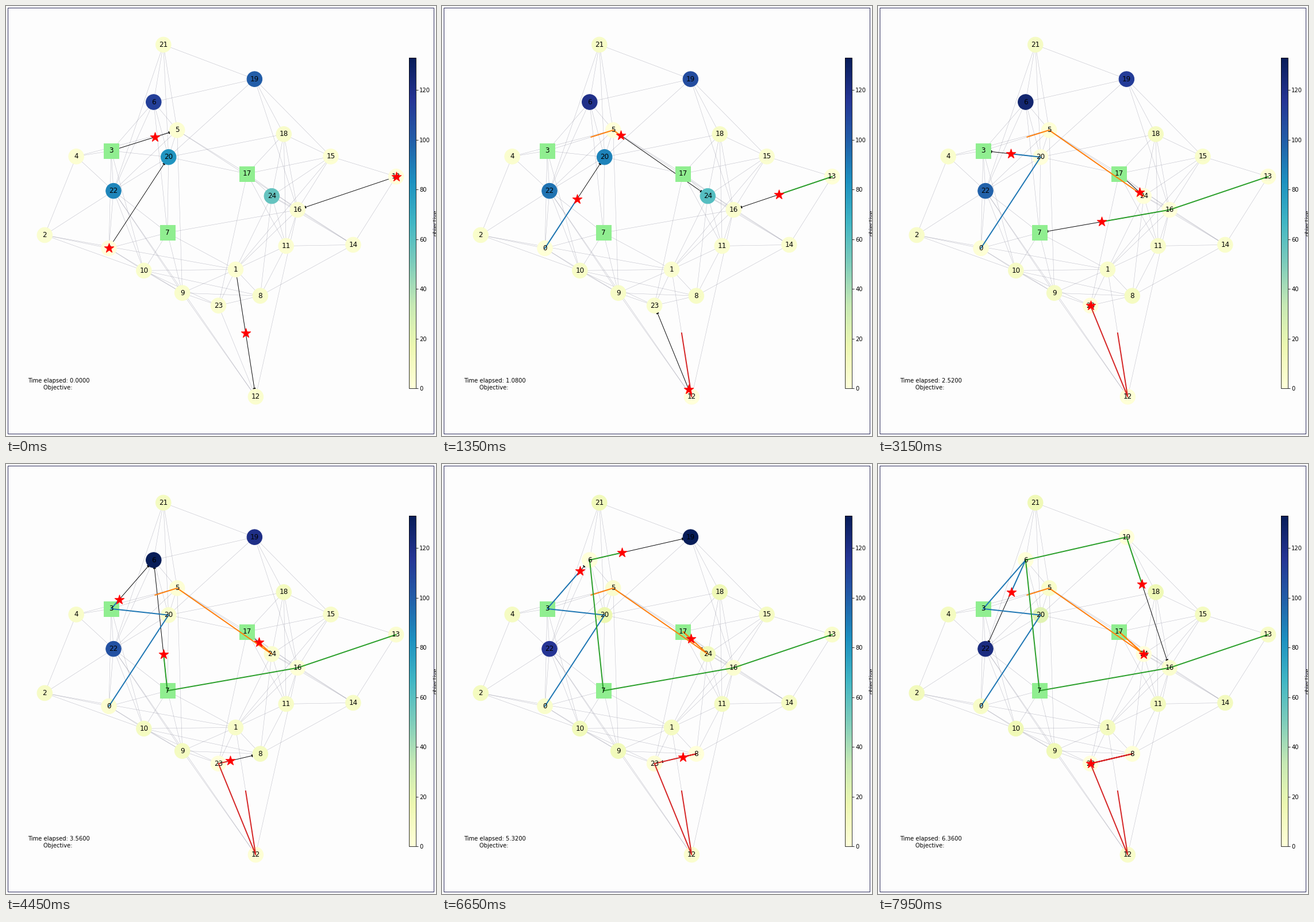
These frames come from a looping animation (748 by 748 pixels, 8 s). A matplotlib script:

```python
import random
from itertools import combinations, pairwise
from math import dist

import matplotlib.pyplot as plt
import numpy as np
from matplotlib.animation import FuncAnimation
from matplotlib.cm import ScalarMappable
from matplotlib.collections import LineCollection
from matplotlib.colors import Normalize
from matplotlib.patches import FancyArrowPatch, Rectangle

SIZE = 748
SPAN = 750        # layout units across the stage
FRAMES = 160
DT = 0.04
TOP = 133
REACH = 155       # nodes closer than this are linked

plt.rcParams["font.family"] = "DejaVu Sans"
rng = random.Random(4)

NODES = [
    (179, 422), (400, 459), (67, 399), (183, 252), (122, 262),
    (298, 216), (257, 167), (281, 395), (443, 505), (307, 500),
    (240, 461), (488, 418), (435, 681), (680, 297), (605, 416),
    (566, 262), (508, 355), (420, 292), (484, 223), (433, 127),
    (283, 263), (274, 67), (187, 322), (370, 522), (463, 331),
]
DEPOTS = (3, 7, 17)
CITIES = [n for n in range(len(NODES)) if n not in DEPOTS]

# chains of links that span more than REACH
CHAINS = [
    (15, 19, 6, 22, 9, 12, 23, 17), (21, 19, 20, 21, 22, 12, 16, 19),
    (14, 8, 24, 14, 5, 9), (8, 10, 2, 1, 10), (20, 18, 11),
    (6, 7, 16), (12, 1, 15), (0, 3, 10), (4, 5),
]

# (node, arrival time) along each route
ROUTES = {
    "tab:blue": [(0, 0), (20, 2), (3, 3), (6, 6), (22, 7)],
    "tab:orange": [(3, -2), (5, 1), (24, 2), (17, 5), (24, 6), (24, 7)],
    "tab:green": [(13, 0), (16, 2), (7, 3), (6, 5), (19, 6), (16, 7)],
    "tab:red": [(1, -1), (12, 1), (23, 2), (23, 3), (8, 5), (23, 6), (23, 7)],
}

BUSY = {6: 112, 19: 100, 20: 82, 22: 87, 24: 57}
BASE = {n: BUSY.get(n, rng.uniform(3, 7)) for n in CITIES}


def links():
    near = {p for p in combinations(range(len(NODES)), 2)
            if dist(NODES[p[0]], NODES[p[1]]) < REACH}
    far = {tuple(sorted(p)) for c in CHAINS for p in pairwise(c)}
    return [(NODES[a], NODES[b]) for a, b in sorted(near | far)]


def value(node, s):
    """Grows steadily and falls to zero at each visit."""
    rate = 1 + BASE[node] / 18
    visits = [w for r in ROUTES.values() for n, w in r
              if n == node and 0 <= w <= s]
    return rate * (s - max(visits)) if visits else BASE[node] + rate * s


def place(route, t):
    times = [when for _, when in route]
    xs, ys = zip(*[NODES[n] for n, _ in route])
    return np.interp(t, times, xs), np.interp(t, times, ys)


def trail(route, t):
    mid = [NODES[n] for n, when in route if 0 < when < t]
    return [place(route, 0), *mid, place(route, t)]


def leg(route, s):
    return next((a, b) for (a, start), (b, end) in pairwise(route)
                if start <= s < end)


fig = plt.figure(figsize=(SIZE / 72, SIZE / 72), dpi=72, facecolor="#fdfdfd")
ax = fig.add_axes([0, 0, 1, 1])
ax.set_xlim(-0.5, SPAN - 0.5)
ax.set_ylim(SPAN - 0.5, -0.5)
ax.axis("off")
ax.add_patch(Rectangle((3, 3), 742, 742, fill=False, ec="#15154a", lw=0.9))
ax.add_collection(LineCollection(links(), colors="#77778c", linewidths=0.5,
                                 alpha=0.5, zorder=1))

norm = Normalize(0, TOP)
dots = ax.scatter(*zip(*[NODES[n] for n in CITIES]), s=700, cmap="YlGnBu",
                  norm=norm, c=[BASE[n] for n in CITIES], zorder=2)
ax.scatter(*zip(*[NODES[n] for n in DEPOTS]), s=700, marker="s",
           c="lightgreen", zorder=2)
for n, (x, y) in enumerate(NODES):
    ax.text(x, y, str(n), size=12, ha="center", va="center", zorder=3)

arrows = [
    ax.add_patch(FancyArrowPatch((0, 0), (1, 1), arrowstyle="-|>",
                                 mutation_scale=10, shrinkA=10, shrinkB=10,
                                 color="black", lw=0.9, zorder=1.5))
    for _ in ROUTES
]
trails = [ax.plot([], [], color=c, lw=2, zorder=2.2)[0] for c in ROUTES]
stars = ax.scatter([0] * 4, [0] * 4, s=300, marker="*", c="red", zorder=4)
clock = ax.text(91.5, 659, "", size=10, ha="center", va="center")

cax = fig.add_axes([701.4 / SIZE, 83 / SIZE, 11.4 / SIZE, 575 / SIZE])
fig.colorbar(ScalarMappable(norm, "YlGnBu"), cax=cax)
cax.tick_params(labelsize=10, pad=2.8)
ax.text(743.8, 378, "objective", size=10, rotation=90, ha="left", va="center")


def update(i):
    t = i * DT
    # nobody arrives at 4, so the plan jumps ahead to 5
    s = i // 25
    s = 5 if s == 4 else s
    dots.set_array(np.array([value(n, s) for n in CITIES]))
    for route, arrow, line in zip(ROUTES.values(), arrows, trails):
        a, b = leg(route, s)
        arrow.set_visible(a != b)
        if a != b:
            arrow.set_positions(NODES[a], NODES[b])
        line.set_data(*zip(*trail(route, t)))
    stars.set_offsets([place(r, t) for r in ROUTES.values()])
    clock.set_text(f"Time elapsed: {t:.4f}\nObjective: ")
    return [dots, stars, clock, *arrows, *trails]


anim = FuncAnimation(fig, update, frames=FRAMES, interval=50,
                     repeat=True, repeat_delay=0, blit=False)
plt.show()
```
